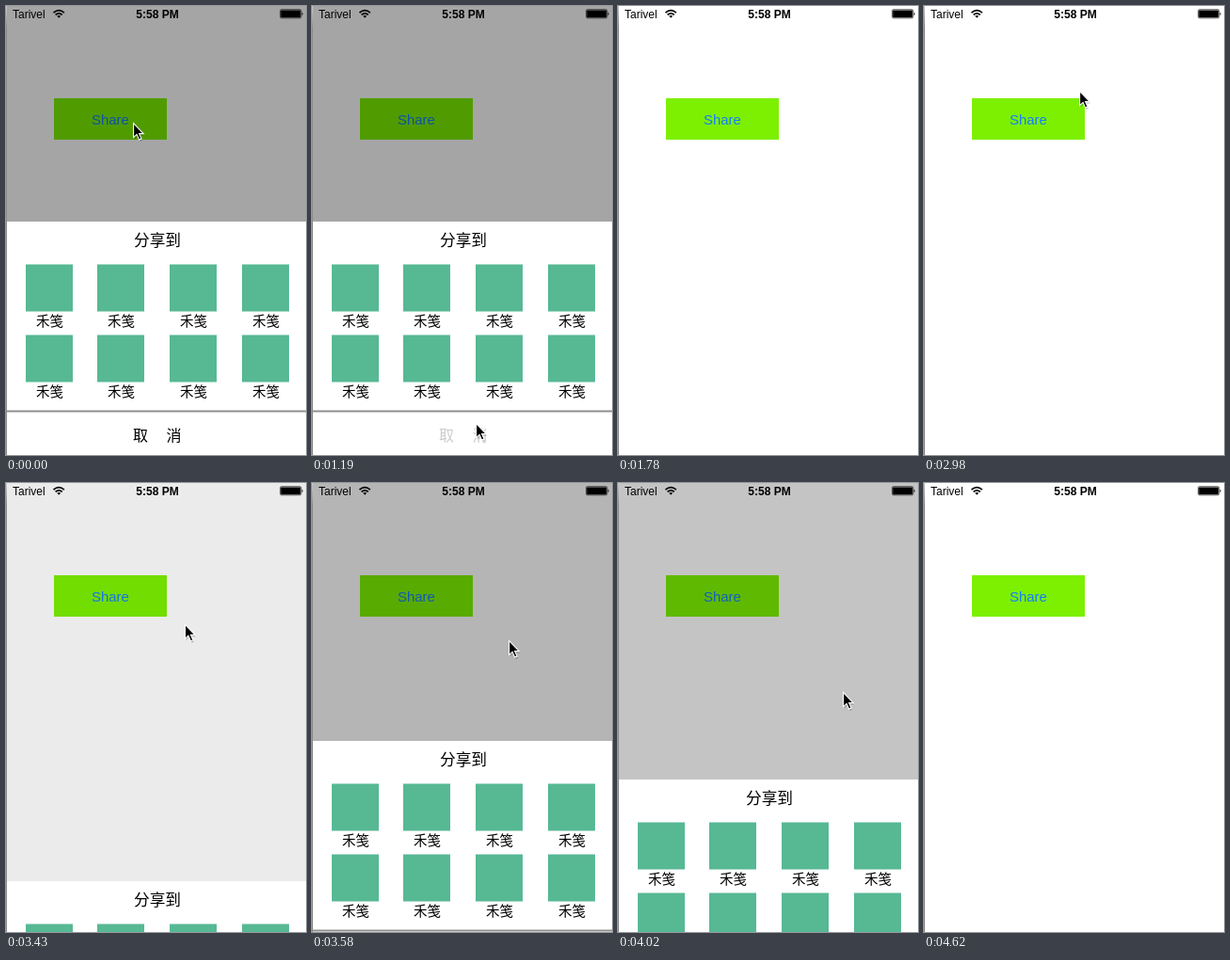
These frames come from a looping animation (319 by 477 pixels, 4.87 s). An HTML page:

```html
<!DOCTYPE html>
<html lang="zh">
<head>
<meta charset="utf-8">
<title>Share sheet</title>
<style>
html, body { margin: 0; width: 100%; height: 100%; overflow: hidden; background: #fff; }
svg { display: block; }
text { font-family: "Liberation Sans", Arial, sans-serif; white-space: pre; }
#sheet text {
  font-family: "Noto Sans CJK SC", "Noto Sans CJK", "Noto Sans CJK JP", sans-serif;
  font-weight: 300; text-anchor: middle;
}
#sheet #cancel text { font-weight: 500; font-size: 16px; }
</style>
</head>
<body>
<svg width="319" height="477" viewBox="0 0 319 477">
  <defs>
    <linearGradient id="edge" x1="0" y1="0" x2="0" y2="1">
      <stop offset="0" stop-color="#ccc"/><stop offset=".05" stop-color="#8c8c8c"/>
    </linearGradient>
    <path id="arrow" d="M0 0V15L3.5 11.8L6 17.5L8.4 16.5L6 11H10.6Z"/>
  </defs>
  <rect width="319" height="477" fill="#fff"/>
  <rect x="51" y="98" width="120" height="44" fill="#7cf000"/>
  <text id="share" x="91" y="125.6" font-size="14.9" fill="#157efb">Share</text>
  <rect id="dim" width="319" height="477"/>

  <g id="sheet">
    <rect y="229" width="319" height="248" fill="#fff"/>
    <text x="161" y="255.3" font-size="16.7">分享到</text>
    <rect y="429.5" width="319" height="2" fill="#8f8f8f"/>
    <g id="cancel"><text x="143" y="461.5">取</text><text x="178.5" y="461.5">消</text></g>
  </g>

  <rect width="1" height="477" fill="url(#edge)"/>
  <text x="7" y="13" font-size="12">Tarivel</text>
  <g fill="none" stroke="#000" stroke-width="1.7">
    <path d="M50.5 7.2Q56.2 2.2 61.9 7.2M52.6 9.4Q56.2 6.2 59.8 9.4"/>
    <path d="M54.2 10.6Q56.2 9.2 58.2 10.6L56.2 12.8Z" fill="#000" stroke="none"/>
  </g>
  <text x="161" y="13" font-size="12" font-weight="bold" text-anchor="middle">5:58 PM</text>
  <rect x="291.5" y="3.7" width="22.4" height="9.2" rx="1.5" fill="none" stroke="#000" stroke-width=".6"/>
  <rect x="292.2" y="4.4" width="21" height="7.8" rx=".8"/>
  <path d="M314.6 6.4q2 1.9 0 3.8z"/>

  <g id="cursor">
    <use href="#arrow" x="1" y="1.8" opacity=".22"/>
    <use href="#arrow" stroke="#fff" stroke-width="1.1"/>
  </g>
</svg>
<script>
const LOOP = 4870, STEP = 149, LAST = 31;
const SLIDE = 2.35;                    // sheet animation length, in steps
const $ = id => document.getElementById(id);

// Pointer stops: step, x, y
const stops = [
  [0, 135.6, 124.6], [7, 174.6, 443.6], [10, 174.6, 443.6], [12, 190, 480],
  [14, 261, 480], [20, 165.6, 90.6], [21, 152, 116], [24, 209.6, 167.6],
  [26, 239.6, 222.6], [28, 239.6, 222.6], [31, 320, 485]
];

function addShareItem(col, row) {
  const x = Math.floor(21 + col * 76.67), y = 274.5 + row * 75;
  $('sheet').insertAdjacentHTML('beforeend',
    `<rect x="${x}" y="${y}" width="50" height="50" fill="#57b894"/>
     <text x="${x + 25.5}" y="${y + 65.5}" font-size="14.5">禾笺</text>`);
}
for (let i = 0; i < 8; i++) addShareItem(i % 4, i >> 2);

function slide(step, start) {
  const t = Math.min(1, Math.max(0, (step - start) / SLIDE));
  return t * t * (3 - 2 * t);
}

function pointerAt(step) {
  const i = Math.max(1, stops.findIndex(s => s[0] >= step));
  const [a, ax, ay] = stops[i - 1], [b, bx, by] = stops[i];
  const u = (step - a) / (b - a);
  return [ax + (bx - ax) * u, ay + (by - ay) * u];
}

function draw(now) {
  // The picture advances in discrete steps
  const step = Math.min(LAST, Math.floor((now % LOOP + 12) / STEP));
  const open = 1 - slide(step, 8.494) + slide(step, 22.289) - slide(step, 26.07);
  $('sheet').setAttribute('transform', `translate(0 ${Math.round(248 * (1 - open))})`);
  $('dim').setAttribute('opacity', 0.353 * open);
  $('cursor').setAttribute('transform', `translate(${pointerAt(step)})`);
  $('cancel').setAttribute('fill', step === 8 ? '#ccc' : '#000');
  $('share').setAttribute('opacity', step === 21 ? 0.25 : 1);
}

const begin = performance.now();
function tick() {
  draw(performance.now() - begin);
  requestAnimationFrame(tick);
}
tick();
</script>
</body>
</html>
```
